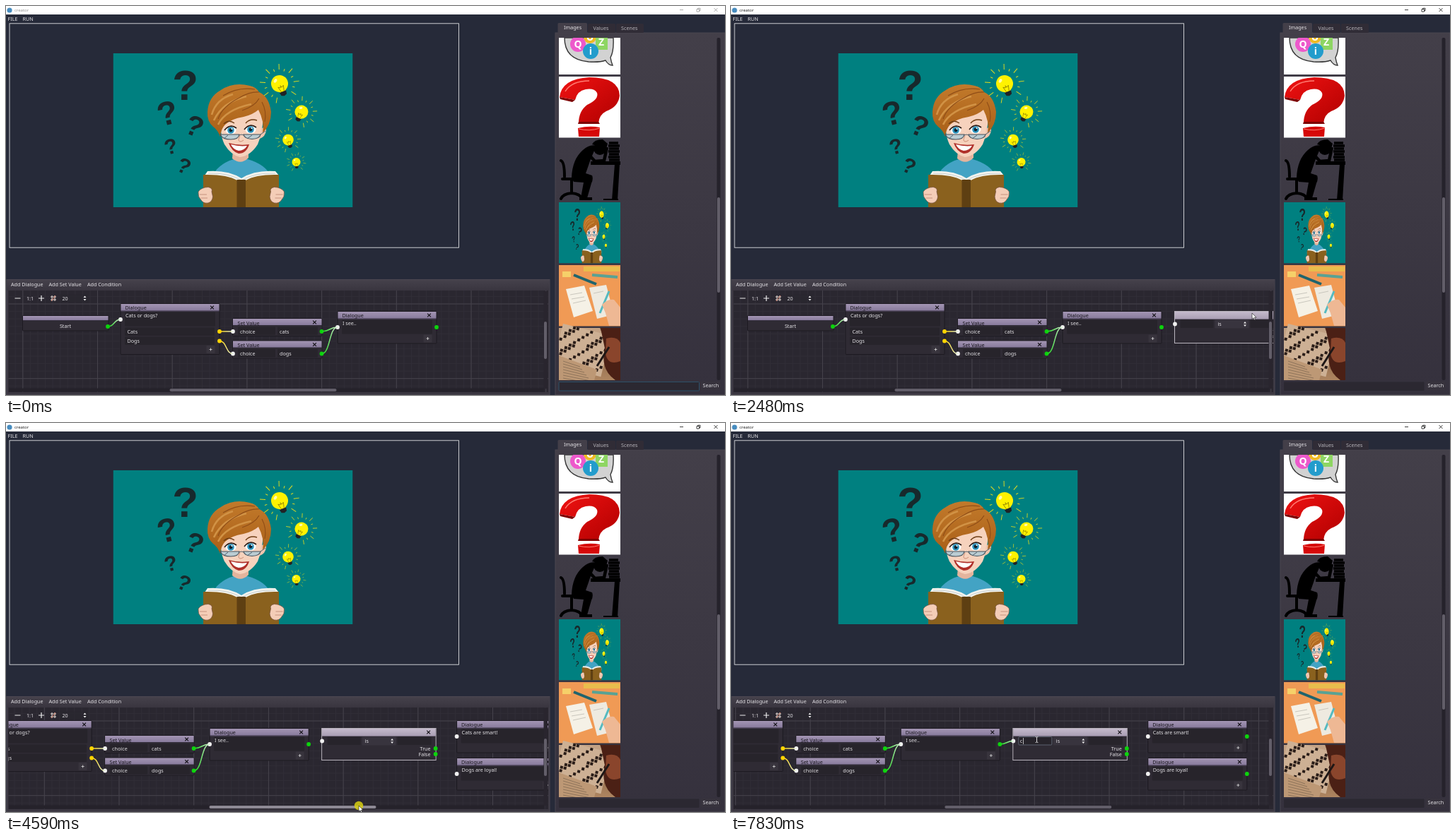
Write an HTML page that moves like this. It is 1017x551 px and loops after 8 s.

```html
<!DOCTYPE html>
<html lang="en">
<head>
<meta charset="utf-8">
<title>creator</title>
<style>
html, body { margin: 0; width: 100%; height: 100%; overflow: hidden; background: #262a39; }
svg { display: block; font: 7.2px "Noto Sans", "Open Sans", sans-serif; }
text { fill: #e3e1e5; white-space: pre; }
</style>
</head>
<body>
<svg id="stage" width="1017" height="551" viewBox="0 0 1017 551"></svg>
<script>
const LOOP = 8000, STEP = 124.2, LEAD = 20, CELL = 10.57;
const GREEN = '#0cd40c', YELLOW = '#ffd500', WHITE = '#f0f0f0';

const rect = (x, y, w, h, fill, more = '') =>
  `<rect x="${x}" y="${y}" width="${w}" height="${h}" fill="${fill}" ${more}/>`;
const text = (x, y, s, more = '') => `<text x="${x}" y="${y}" ${more}>${s}</text>`;
const path = (d, fill, more = '') => `<path d="${d}" fill="${fill}" ${more}/>`;
const line = (d, stroke, width = 1, more = '') =>
  path(d, 'none', `stroke="${stroke}" stroke-width="${width}" ${more}`);
const dot = (x, y, fill, r = 2.9, more = '') => `<circle cx="${x}" cy="${y}" r="${r}" fill="${fill}" ${more}/>`;
const oval = (x, y, rx, ry, fill, more = '') =>
  `<ellipse cx="${x}" cy="${y}" rx="${rx}" ry="${ry}" fill="${fill}" ${more}/>`;
const group = (body, more = '') => `<g ${more}>${body}</g>`;
const gradient = (id, from, to, more = 'x1="0" y1="0" x2="0" y2="1"') =>
  `<linearGradient id="${id}" ${more}><stop stop-color="${from}"/><stop offset="1" stop-color="${to}"/></linearGradient>`;

const defs = `<defs>
  ${gradient('header', '#a395b3', '#85789a')}${gradient('picked', '#c4bacc', '#a99eb3')}
  ${gradient('bar', '#45414b', '#39353f')}${gradient('side', '#433f49', '#35313d')}
  ${gradient('hair', '#c27a2b', '#a95f18')}${gradient('red', '#f01212', '#b00000', 'x1="0" y1="0" x2="1" y2="1"')}
  ${gradient('photo', '#6b4a33', '#b98f68')}
  ${gradient('link', GREEN, '#d5f5d5', 'gradientUnits="userSpaceOnUse" x1="609" y1="0" x2="628" y2="0"')}
  <pattern id="grid" width="${CELL}" height="${CELL}" patternUnits="userSpaceOnUse" x="129" y="421.5">
    ${line(`M0 .5H${CELL}M.5 0V${CELL}`, '#302d36')}</pattern>
  <pattern id="major" width="${CELL * 10}" height="${CELL * 10}" patternUnits="userSpaceOnUse" x="129" y="421.5">
    ${line(`M0 .5H${CELL * 10}M.5 0V${CELL * 10}`, '#45424b')}</pattern>
  <clipPath id="graphClip">${rect(3.5, 403, 763.5, 144, '#000')}</clipPath>
  <clipPath id="listClip">${rect(782, 45, 87, 485, '#000')}</clipPath>
  <clipPath id="artClip">${rect(151.5, 67, 339, 218, '#000')}</clipPath>
</defs>`;

// --- illustration ---
function bulb(x, y, r, turn) {
  let rays = '';
  for (let i = 0; i < 15; i++) {
    const a = (122 + i * 21) * Math.PI / 180, near = i % 2 ? 18.5 : 20, far = i % 2 ? 22 : 28;
    const at = d => `${(d * Math.cos(a)).toFixed(1)} ${(d * Math.sin(a)).toFixed(1)}`;
    rays += `M${at(near)}L${at(far)}`;
  }
  return group(
    line(rays, '#e6dc1c', .95) + path('M-5 9L-4 13H4L5 9Z', '#f7e800') + dot(0, 0, '#fff200', 12) +
    path('M-5 12H5L4 17L0 18.5L-4 17Z', '#202326') +
    line('M-2 12L-4 4L-1 6L0 3L1 6L4 4L2 12', '#8d8200', .8) + oval(-4, -6, 3, 2, '#fffbb0', 'transform="rotate(-35 -4 -6)"'),
    `transform="translate(${x} ${y}) rotate(${turn}) scale(${r / 12})"`);
}

const question = (x, y, size, turn) => text(0, size * .36, '?',
  `style="fill:#17292c;font:bold ${size}px 'Liberation Sans',Arial,sans-serif" text-anchor="middle" transform="translate(${x} ${y}) rotate(${turn})"`);

const eye = (x, y) => oval(x, y, 7.5, 5.8, '#fff') + dot(x, y, '#2b93bd', 4.8) + dot(x, y, '#10222e', 2.4) +
  dot(x + 1.5, y - 2, '#fff', 1.1) + line(`M${x - 9} ${y}Q${x - 1} ${y - 10} ${x + 8} ${y - 3}`, '#2a1a14', 1.6);

const hand = group(
  path('M272 263Q276 257 286 256.5Q293 258 291 263L292.5 270Q292 277 286 279Q279 280 276 275Q271 270 272 263Z', '#f4cdb7', 'stroke="#6d4a3a" stroke-width=".7"') +
  line('M274 267H284M276 272H285', '#b98570', .8));

const art = group(
  rect(151.5, 67, 339, 218, '#008080') +
  question(253.5, 111.5, 60, 0) + question(228, 151, 47, -14) + question(267, 169.5, 40, 22) +
  question(233, 198.5, 30, -14) + question(252, 226, 30, 24) +
  bulb(387, 110, 12, -22) + bulb(418, 150, 9.5, 25) + bulb(399, 189.5, 7.8, -18) + bulb(410.5, 221, 6, -6) +
  path('M291 246Q294 229 316 219Q332 212 348 219Q372 228 376 246Z', '#43a3c4') +
  path('M321 204H343V215Q332 226 320 216Z', '#e4b49d') +
  path('M304 155Q302 182 309 196Q318 211 331 214Q346 212 356 196Q364 178 364 150Q335 132 304 155Z', '#f6d2bd') +
  path('M361 174Q368 168 368 176Q367 185 359 188Z', '#f0c4ad') +
  path('M303 185Q299 175 293 171Q284 163 285 150Q286 129 304 119Q322 107 345 113Q354 115 358 122Q372 128 375 150Q375 168 363 180Q366 164 357 147Q349 154 336 157Q318 160 310 168Q304 174 303 185Z', 'url(#hair)') +
  line('M291 154Q297 132 321 125M300 168Q310 147 347 139M294 162Q306 136 340 128', '#d19245', 2.6) +
  line('M358 122Q345 121 330 130Q306 142 300 160M352 118Q328 114 307 127M358 131Q352 142 334 148M362 136Q369 149 366 164', '#8f4d17', 1.2) +
  line('M308 167Q315 160 323 166M339 166Q345 159 355 162', '#703e16', 1.5) +
  eye(318, 176) + eye(346, 175) +
  path('M303 182H330Q329 189 318 189Q306 189 303 182ZM336 182H360Q359 188 348 188.5Q337 188 336 182Z', '#b4cbd5', 'stroke="#46525c" stroke-width="1.2" fill-opacity=".9"') +
  line('M330 183Q333 181 336 183M360 182L367 177M308 188L314 183M341 188L348 183', '#51616e', 1) +
  line('M331 184Q327 191 331 192Q334 192 336 190', '#cb8d75', 1) +
  path('M315 194Q329 198 344 196Q340 209 329 209Q319 206 315 194Z', '#b0302a') +
  path('M318 196Q330 199.500 341 198Q337 205 329 205Q321 203 318 196Z', '#fff') +
  path('M281 240L285 234Q314 232 333 244Q352 232 381 234L386 240V249H279Z', '#f4f4ee') +
  line('M286 237Q315 236 333 247Q351 236 381 237', '#bac5c7', .8) +
  path('M279 239Q312 238 327 247H339Q354 238 386 239V285H279Z', '#8a611e') +
  rect(326.5, 246, 12.5, 39, '#5e3f12') + hand +
  group(hand, 'transform="translate(665.5 0) scale(-1 1)"'),
  'id="art" clip-path="url(#artClip)"');

// --- image list ---
const badge = (x, y, r, fill, letter) => dot(x, y, fill, r) +
  text(x, y + 5, letter, 'text-anchor="middle" style="fill:#fff;font-size:14px;font-weight:bold"');

const quizThumb = rect(782, 45, 87, 52, '#fff') +
  path('M790 45Q790 76 824 79Q840 80 848 77Q852 84 858 84Q856 79 855 73Q860 64 859 45Z', '#d2d2d2', 'stroke="#343434" stroke-width="1.4"') +
  badge(826, 44, 9, '#efba23', 'U') + badge(809, 54, 11, '#ed59cb', 'Q') +
  rect(834, 42, 17, 20, '#8ed663') + text(842, 56, 'Z', 'text-anchor="middle" style="fill:#fff;font-size:14px;font-weight:bold"') +
  badge(827, 64, 11, '#239ccc', 'i');

const redThumb = rect(782, 100, 87, 86.5, '#fff') +
  path('M783 129Q786 103 825 101Q867 101 868 127Q866 143 849 149Q839 154 838 166H810Q810 149 822 140Q839 132 836 123Q832 116 820 118Q808 120 805 133Z', 'url(#red)') +
  path('M810 164L838 164L840 167H809ZM783 129L805 133L801 136L784 132Z', '#7d0000') +
  path('M809 173Q825 169 840 172L839 185H810Z', '#d60808') + line('M791 121Q800 106 825 106', '#ff7c72', 1.4) + line('M810 174Q825 178 840 173', '#ff7c72', 1);

const deskThumb = group(
  dot(840, 202, '#000', 9) + path('M829 196Q832 189 844 189L851 195L849 202Z', '#000') +
  path('M800 243Q801 217 816 204Q826 195 835 198L827 217L820 237L829 240Q831 245 828 251L822 272H813L817 250L803 249Z', '#000') +
  line('M822 208L833 220L846 219L850 200', '#000', 4.5, 'stroke-linejoin="round"') +
  line('M785 219Q790 221 790 242M787 245H812M800 246V265M785 273Q788 266 800 265Q812 266 815 273', '#000', 4, 'stroke-linecap="round"') +
  path('M827 220H869V225H827ZM861 224H868L865 275H857ZM811 271H829V275H811ZM845 273H866V275H845Z', '#000') +
  line('M853 194H866M852 198H868M853 202H867M852 206H868M853 210H867M852 214H868M853 218H868', '#000', 3.5));

const paperThumb = rect(782, 367, 87, 86.5, '#f09a55') +
  rect(787, 376, 12, 8, '#f6d069') + rect(817, 369, 51, 7, '#e9bd4d') +
  line('M803 381L835 394', '#21646d', 4) + line('M829 381L865 384', '#58a294', 4) +
  path('M792 401L818 396L830 432L803 441Z', '#f5f1e6') + path('M825 399L849 395L860 437L836 443Z', '#eeeae0') +
  line('M798 409L815 406M800 415L818 412M802 421L820 417M831 407L845 404', '#c9c6bd', 1) +
  line('M840 435L853 404', '#55bac0', 3) +
  path('M843 423Q852 414 860 416L869 427V453H853L848 435Z', '#eeb894');

function crosswordThumb() {
  let cells = '';
  for (let i = 0; i < 182; i++) {
    if (Math.sin(i * 127.1 + 3) > .5) cells += `M${(i % 14) * 5} ${Math.floor(i / 14) * 5}h4v4h-4z`;
  }
  const words = Array.from({ length: 8 }, (_, i) => `M788 ${503 + i * 4}l${24 + i * 3} 8`).join('');
  return rect(782, 456, 87, 86, 'url(#photo)') + path('M782 456H840L855 493L829 530H782Z', '#c2a184') +
    group(rect(0, 0, 70, 60, '#cdb094') + path(cells, '#2a1d18'), 'transform="translate(788 450) rotate(14)"') +
    path('M782 495L836 515L829 542H782Z', '#bd9875') + line(words, '#826a53', .8) +
    path('M841 456H869V530H862Q840 515 847 485Z', '#4b2015') + path('M849 471Q864 467 869 477V503Q851 510 848 492Z', '#8a452c') +
    line('M836 510L853 483', '#1e1716', 3);
}

function sidebar() {
  return rect(777, 38, 240, 513, 'url(#side)', 'stroke="#4a4650" stroke-width="1"') +
    rect(780.5, 24, 41.5, 14.5, '#433f49', 'rx="1.5"') +
    rect(823, 25, 39, 13, '#302c36', 'rx="1.5"') + rect(863, 25, 39, 13, '#302c36', 'rx="1.5"') +
    text(789, 33, 'Images') + text(830.5, 33.5, 'Values', 'fill-opacity=".75"') + text(870, 33.5, 'Scenes', 'fill-opacity=".75"') +
    group(quizThumb + redThumb + deskThumb + paperThumb + crosswordThumb(), 'clip-path="url(#listClip)"') +
    `<use href="#art" transform="translate(782 278) scale(${87 / 339} ${86.5 / 218}) translate(-151.5 -67)"/>` +
    rect(1005.5, 45, 5, 485, '#25222b', 'rx="2"') + rect(1006, 271, 4, 135, '#625e69', 'rx="2"') +
    rect(782, 532.5, 198.5, 12.5, '#2b2831', 'id="search" rx="1"') +
    rect(982.5, 531.5, 28, 13, '#37333d', 'rx="1"') + text(985.5, 540, 'Search');
}

// --- graph ---
const closeMark = (x, y) => line(`M${x - 2.4} ${y - 2.4}l4.8 4.8m0 -4.8l-4.8 4.8`, '#17141a', 1.2);
const field = (x, y, w, h = 11.5) => rect(x, y, w, h, '#27242b', 'rx="1"');
const arrows = (x, y) => path(`M${x - 2} ${y - 1}l2 -2.5l2 2.5zM${x - 2} ${y + 1}l2 2.5l2 -2.5z`, '#eee');

function frame(x, y, w, h, title = '', head = 10.5, close = true) {
  return rect(x, y, w, h, '#2f2b34', 'stroke="#1d1a21" stroke-width="1" rx="1"') +
    rect(x + .5, y + .5, w - 1, head, 'url(#header)') + line(`M${x} ${y + head}h${w}`, '#221e27', .8) +
    (title && text(x + 6.5, y + 8, title, 'style="fill:#17141a"')) + (close ? closeMark(x + w - 10.5, y + 5.5) : '');
}
const plus = (x, y) => rect(x - 6, y - 5.5, 12, 11, '#38343d', 'rx="1"') + line(`M${x - 2} ${y}h4m-2 -2v4`, '#ddd', .8);

const dialogue = (x, y, words, h = 45.5) => frame(x, y, 140, h, 'Dialogue') + field(x + 6, y + 12, 128, 20) +
  text(x + 7, y + 19.5, words) + plus(x + 127.5, y + h - 7) + dot(x, y + 22.5, WHITE);

const setValue = (y, word) => frame(320.5, y, 126.5, 25, '', 10) + text(327.5, y + 9, 'Set Value', 'style="fill:#17141a"') +
  rect(321, y + 10, 125.5, 14.5, '#2f2b34') + field(328, y + 12, 53) + field(384, y + 12, 57) +
  text(331, y + 21, 'choice') + text(387, y + 21, word) + dot(321, y + 18.5, WHITE) + dot(446.5, y + 18.5, GREEN);

const curve = (x1, y1, x2, y2) => {
  const bend = Math.max(6, Math.abs(x2 - x1) * .55);
  return `M${x1} ${y1}C${x1 + bend} ${y1} ${x2 - bend} ${y2} ${x2} ${y2}`;
};
const wire = (id, color, ...p) =>
  gradient(id, color, '#e4f2e0', `gradientUnits="userSpaceOnUse" x1="${p[0]}" y1="0" x2="${p[2]}" y2="0"`) +
  line(curve(...p), `url(#${id})`, 1.5);

const nodes = frame(23.5, 438.5, 121.5, 21.5, '', 7, false) + text(84, 456, 'Start', 'text-anchor="middle"') +
  dialogue(162, 421.5, 'Cats or dogs?', 72) + field(168, 455.5, 127) + field(168, 468.5, 127) +
  text(171.5, 463.5, 'Cats') + text(171.5, 476.5, 'Dogs') +
  setValue(442.5, 'cats') + setValue(474, 'dogs') + dialogue(469, 432.5, 'I see..') +
  dialogue(818.5, 421.5, 'Cats are smart!') + dialogue(818.5, 474.5, 'Dogs are loyal!') +
  dot(958.5, 444, GREEN) + dot(958.5, 497, GREEN) +
  wire('w1', GREEN, 144, 454, 162, 444) + wire('w2', YELLOW, 302, 461, 321, 461) + wire('w3', YELLOW, 302, 474.5, 321, 492.5) +
  wire('w4', GREEN, 446.5, 461, 469, 455) + wire('w5', GREEN, 446.5, 492.5, 469, 455) +
  dot(144, 454, GREEN) + dot(302, 461, YELLOW) + dot(302, 474.5, YELLOW) + dot(609, 455, GREEN);

const condition = group(
  frame(0, 0, 161.5, 45, '', 10.5, false) + rect(.5, .5, 160.5, 10.5, 'url(#picked)', 'id="pickedHead"') +
  closeMark(151, 5.5) + field(8, 12, 47) + rect(57, 12, 48, 12, '#38343e', 'rx="1"') + field(107, 12, 48) +
  text(61, 20.5, 'is') + arrows(99.5, 18) +
  text(154, 31.5, 'True', 'text-anchor="end"') + text(154, 39.5, 'False', 'text-anchor="end"') +
  rect(0, 0, 161.5, 45, 'none', 'id="pickedEdge" stroke="#b9b4bd" stroke-width="1"') +
  rect(8, 12, 47, 11.5, 'none', 'id="focus" stroke="#68707f" stroke-width=".8" rx="1"') +
  text(10, 20.5, 'c', 'id="typed"') + rect(10.5, 13.5, .8, 9, '#ddd', 'id="caret"') +
  dot(.5, 18, WHITE) + dot(161, 28.5, GREEN) + dot(161, 36.5, GREEN), 'id="condition"');

function graphPanel() {
  const hash = line('M65 410v8m4 -8v8m-6 -6h8m-8 4h8', '#e6dcd6', 1) + line('M64 418l6 -8', '#e7795e', .8);
  return rect(1, 387.5, 768, 163.5, '#3b3741', 'stroke="#4b4751" stroke-width="1"') +
    rect(1.5, 388, 767, 15, 'url(#bar)') + rect(112, 389, 54, 11.5, '#18151d', 'id="hover"') +
    text(7, 397, 'Add Dialogue') + text(60.5, 397, 'Add Set Value') + text(115, 397, 'Add Condition') +
    group(rect(3, 402, 765, 146, '#2a2730') +
      group(rect(0, 400, 1060, 150, 'url(#grid)') + rect(0, 400, 1060, 150, 'url(#major)') + nodes + condition +
        line('', 'url(#link)', 1.5, 'id="newWire"'), 'id="world"'), 'clip-path="url(#graphClip)"') +
    rect(76, 408.5, 40, 11, '#2a2730', 'fill-opacity=".7"') +
    line('M12.5 414h8M46 414h8m-4 -4v8', '#eee', 1.2) + text(29, 417, '1:1', 'font-weight="500"') + hash +
    text(79.5, 416.5, '20') + arrows(111.5, 414) +
    rect(760.5, 404, 5.5, 138, '#29252e') + rect(761, 447, 4, 53, '#625e69', 'rx="2"') +
    rect(4, 541.5, 757, 5, '#25222a') + rect(231.5, 542, 236, 4, '#625e69', 'id="thumb" rx="2"');
}

const windowBar = rect(0, 0, 1017, 12, '#fff') + dot(5, 6, '#478cbf', 3.6) +
  group('<text x="12" y="8.3" style="fill:inherit;font:6px \'Open Sans\',sans-serif">creator</text>' +
    line('M953 5.5h5M977 4.5h3.5v3.5h-3.5zM978.5 4.5v-1.3h3.5v3.5h-1.5M1001.5 3l5 5m0 -5l-5 5', 'currentColor', .8), 'id="chrome"');

const pointer = group(path('M0 0V8.4L2 6.7L3.4 9.8L4.8 9.2L3.4 6.2H6Z', '#fff', 'stroke="#111" stroke-width=".6"'), 'id="arrow"') +
  group(line('M-1.8 -4Q0 -4 0 -3V3Q0 4 -1.8 4M1.8 -4Q0 -4 0 -3M0 3Q0 4 1.8 4', '#eee', .9), 'id="beam"');

const stage = document.getElementById('stage');
stage.innerHTML = defs + rect(0, 0, 1017, 551, '#262a39') + windowBar +
  text(2.5, 20.5, 'FILE') + text(23.5, 20.5, 'RUN') +
  rect(5, 24.8, 635.5, 317.4, 'none', 'stroke="#dcdde0" stroke-width=".9"') + art + sidebar() + graphPanel() +
  group(dot(0, 0, '#d8d012', 6.2, 'id="press" fill-opacity=".85"') + pointer, 'id="cursor"');

// --- motion ---
const $ = id => document.getElementById(id);
const show = (id, on) => $(id).setAttribute('visibility', on ? 'visible' : 'hidden');
const place = (id, x, y) => $(id).setAttribute('transform', `translate(${x} ${y})`);

function track(keys, step) {
  const next = keys.findIndex(key => key[0] > step);
  if (next < 0) return keys[keys.length - 1].slice(1);
  if (next === 0) return keys[0].slice(1);
  const a = keys[next - 1], b = keys[next], p = (step - a[0]) / (b[0] - a[0]);
  return a.slice(1).map((v, i) => v + (b[i + 1] - v) * p);
}

const cursorKeys = [[1, 490, 473], [4, 300, 425], [7, 143, 394], [9, 143, 394], [14, 198, 477], [15, 385, 467], [16, 589, 455],
  [17, 670, 446], [18, 715, 439], [20, 737, 435], [22, 737, 435], [24, 600, 480], [25, 480, 537], [26, 440, 556],
  [27, 440, 556], [28, 440, 548], [30, 440, 548], [31, 443, 542], [32, 443, 542], [37, 499, 542], [40, 514, 543], [41, 514, 543],
  [43, 490, 505], [44, 440, 464], [45, 385, 448.5], [46, 368, 454], [50, 365, 455], [52, 380, 454], [54, 399, 450],
  [56, 432.5, 448.5]];
const thumbKeys = [[32, 0], [37, 56], [40, 70.8]];
const presses = [[8, 9], [14, 20], [32, 41], [52, 55], [57, 58]];
const snap = (v, origin) => origin + Math.round((v - origin) / CELL) * CELL;

function draw(time) {
  const step = Math.min(63, Math.floor((time + LEAD) / STEP));
  const [x, y] = track(cursorKeys, step), [slide] = track(thumbKeys, step);
  const scroll = slide * 3.23;

  const focused = step >= 8;
  $('chrome').setAttribute('style', focused ? 'fill:#111;color:#111' : 'fill:#8a8a8a;color:#999');
  $('search').setAttribute('stroke', focused ? 'none' : '#2d5168');
  show('hover', step >= 8 && step < 10);

  place('world', -scroll, 0);
  $('thumb').setAttribute('x', 231.5 + slide);
  $('thumb').setAttribute('fill', step === 25 || (step > 30 && step < 43) ? '#8d8994' : '#625e69');

  show('condition', step >= 9);
  if (step < 15) place('condition', 87, 474.5);
  else if (step < 20) place('condition', snap(x - 110, 627.5), snap(y - 2, 432.5));
  else place('condition', 627.5, 432.5);
  const on = visible => visible ? 'inherit' : 'hidden';
  for (const id of ['pickedHead', 'pickedEdge']) $(id).setAttribute('visibility', on(step >= 14));
  for (const id of ['focus', 'caret']) $(id).setAttribute('visibility', on(step >= 57));
  $('typed').setAttribute('visibility', on(step >= 63));
  $('caret').setAttribute('x', step >= 63 ? 14.2 : 10.5);

  show('newWire', step >= 53);
  $('newWire').setAttribute('d', step >= 54 ? curve(609, 455, 628, 450.5) : curve(609, 455, x + scroll, y));

  place('cursor', x, y);
  const visible = step > 0, typing = step >= 55;
  show('arrow', visible && !typing);
  show('beam', visible && typing);
  show('press', presses.some(([from, to]) => step >= from && step < to));
}

const start = performance.now();
function tick(now) {
  draw(Math.max(0, now - start) % LOOP);
  requestAnimationFrame(tick);
}
draw(0);
requestAnimationFrame(tick);
</script>
</body>
</html>
```
